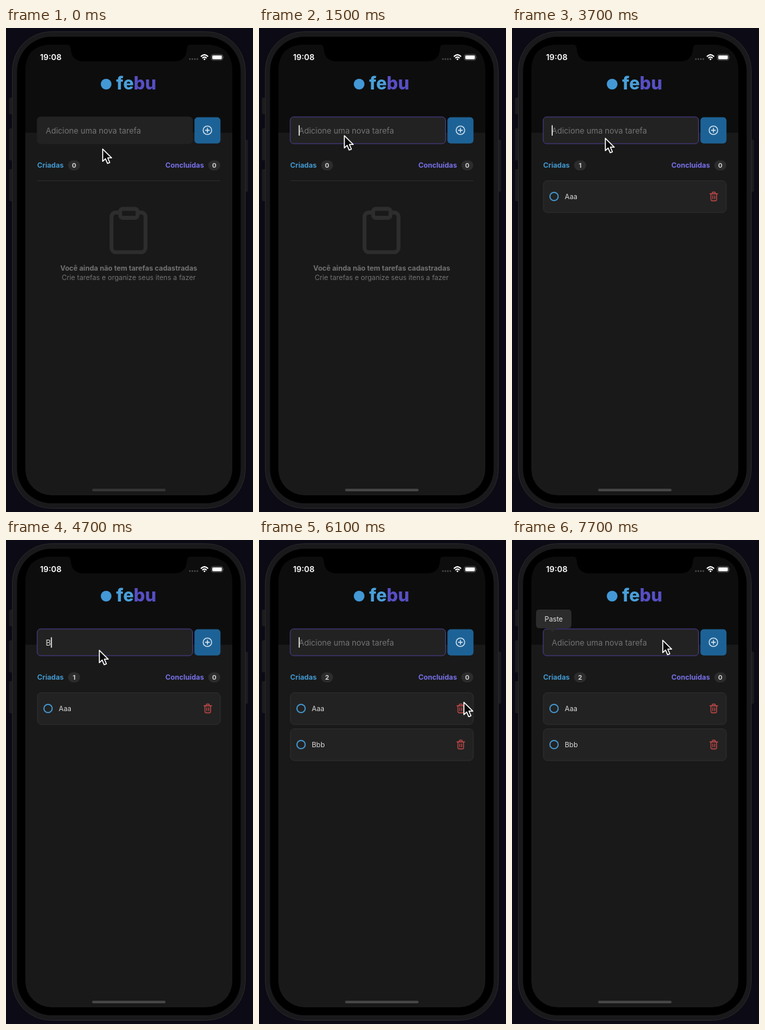
An HTML page that plays this animation: 370x724 px, repeating every 8000 ms.

```html
<!DOCTYPE html>
<html lang="pt">
<head>
<meta charset="utf-8">
<style>
  html, body { margin: 0; width: 100%; height: 100%; overflow: hidden; background: #0c0a14; }
  svg { display: block; width: 370px; height: 724px; font: 10.4px Inter, sans-serif; }
  .bold { font-weight: 700; font-size: 10.5px; }
  .mid { text-anchor: middle; }
  .line { fill: none; stroke-linecap: round; stroke-linejoin: round; }
</style>
</head>
<body>
<svg viewBox="0 0 370 724">
  <defs>
    <g id="card">
      <rect x="47" y="228.5" width="274" height="47.5" rx="6" fill="#222" stroke="#2e2e2e"/>
      <circle cx="63" cy="252" r="6.2" fill="none" stroke="#4398cf" stroke-width="1.7"/>
      <path class="line" stroke="#c24848" stroke-width="1.3"
        d="M296.5 248H308M298 248V257Q298 258.5 299.5 258.5H305Q306.5 258.5 306.5 257V248M300 248V246.5Q300 245.5 301 245.5H303.5Q304.5 245.5 304.5 246.5V248M300.8 251V255.5M303.7 251V255.5"/>
    </g>
  </defs>

  <!-- phone -->
  <g fill="#1c1c1f">
    <rect x="4.5" y="104" width="7" height="25" rx="2"/>
    <rect x="4.5" y="150" width="7" height="48" rx="2"/>
    <rect x="4.5" y="211" width="7" height="48" rx="2"/>
    <rect x="356" y="167" width="6.5" height="78" rx="2"/>
  </g>
  <rect x="9.5" y="5.5" width="349" height="713" rx="58" fill="#19191b" stroke="#272729"/>
  <rect x="16.5" y="13" width="335" height="698" rx="52" fill="#000"/>
  <rect x="29" y="25" width="310" height="674" rx="39" fill="#191919"/>
  <path d="M29 156.5V64Q29 25 68 25H300Q339 25 339 64V156.5Z" fill="#0d0d0d"/>
  <path d="M90 24Q97 25 97 31Q98 50 117 50H251Q270 50 271 31Q271 25 278 24Z" fill="#000"/>

  <!-- status bar -->
  <text x="51" y="48.3" font-size="12" font-weight="600" fill="#fff">19:08</text>
  <path class="line" d="M275.5 46.5H287" stroke="#505050" stroke-width="2.4" stroke-dasharray="0 3.7"/>
  <path class="line" d="M292.5 42.3Q297.3 37.7 302.1 42.3M294.6 44.6Q297.3 42.2 300 44.6" stroke="#fff" stroke-width="1.9"/>
  <circle cx="297.3" cy="46.8" r="1.3" fill="#fff"/>
  <rect x="307.7" y="39.7" width="17" height="8.3" rx="2.5" fill="none" stroke="#777" stroke-width=".8"/>
  <rect x="309" y="41" width="14.4" height="5.7" rx="1.4" fill="#fff"/>
  <path d="M325.7 42.5Q327 43.8 325.7 45.2Z" fill="#777"/>

  <!-- header -->
  <circle cx="150" cy="84" r="8" fill="#4398d6"/>
  <text x="165" y="92" font-size="26.5" font-weight="800" fill="#4a9fd9">fe<tspan fill="#574fc4">bu</tspan></text>

  <rect id="field" x="46.8" y="133" width="232.6" height="40" rx="5" fill="#222"/>
  <text id="typed" x="59.5" y="157.5" font-size="11.85"></text>
  <rect id="caret" x="59.5" y="145.5" width="1.5" height="15.5" fill="#eee"/>
  <rect id="button" x="282.3" y="133.5" width="39" height="39.3" rx="5"/>
  <g id="plus" class="line" stroke="#dce8f0" stroke-width="1.3">
    <circle cx="301.7" cy="153" r="6.4"/>
    <path d="M298.7 153H304.7M301.7 150V156"/>
  </g>
  <g id="spinner" class="line" stroke="#d3e2ec" stroke-width="1.6"></g>

  <!-- counters -->
  <g class="bold">
    <text x="46.8" y="209.3" fill="#4398cf">Criadas</text>
    <text x="238.8" y="209.3" fill="#7770e8">Concluídas</text>
    <rect x="93" y="198" width="18" height="15" rx="7.5" fill="#2c2c2c"/>
    <rect x="303" y="198" width="18" height="15" rx="7.5" fill="#2c2c2c"/>
    <g class="mid" font-size="9.5" fill="#d4d4d4">
      <text id="count" x="102" y="209"></text>
      <text x="312" y="209">0</text>
    </g>
  </g>

  <!-- empty list -->
  <g id="empty">
    <path d="M47 228.5H321" stroke="#2b2b2b"/>
    <g stroke="#2d2d2d" stroke-width="5.8" fill="#191919">
      <rect x="158" y="276" width="51" height="59.3" rx="6.5"/>
      <rect x="171" y="270.5" width="26" height="13.5" rx="4"/>
    </g>
    <g class="mid" fill="#727272">
      <text class="bold" x="183.8" y="362.7">Você ainda não tem tarefas cadastradas</text>
      <text x="183.8" y="377">Crie tarefas e organize seus itens a fazer</text>
    </g>
  </g>

  <g fill="#d8d8d8">
    <g id="first"><use href="#card"/><text x="79" y="256">Aaa</text></g>
    <g id="second"><use href="#card" y="54"/><text x="79" y="310">Bbb</text></g>
  </g>

  <g id="paste">
    <path d="M41 104H84Q89 104 89 109V127Q89 132 84 132H66L60.5 137.5L55 132H41Q36 132 36 127V109Q36 104 41 104Z" fill="#2c2c2d"/>
    <text class="mid" x="62.5" y="122" fill="#e2e2e2">Paste</text>
  </g>

  <rect id="home" x="129" y="689.3" width="110" height="3.7" rx="1.8"/>
  <path id="pointer" d="M.8 1V19.5L5 15.6L8.1 22.6L11.4 21.2L8.4 14.3H14.2Z" fill="#080808" stroke="#fff" stroke-width="1.5" stroke-linejoin="round"/>
</svg>

<script>
const LOOP = 8000, STEP = 100;
const FOCUS = 1200;

// Each round types a word, waits for the server, then adds the task.
const WORDS = ['Aaa', 'Bbb'], FIRST_ROUND = 1700, ROUND = 2900;
const LETTER = 200, SUBMIT = 1000, ADDED = 1400, PASTE = ADDED + 1200;

// Pointer stops: arrival, travel time, x, y
const stops = [
  [0, 0, 144, 180], [800, 700, 127, 160], [2500, 700, 308, 160], [3600, 600, 139, 164],
  [5400, 700, 310, 154], [6300, 500, 304, 263], [6900, 600, 225, 149]
];

const el = id => document.getElementById(id);
const set = (id, attrs) => { for (const k in attrs) el(id).setAttribute(k, attrs[k]); };
const show = (id, amount) => set(id, { opacity: Number(amount) });
const clamp = v => Math.min(1, Math.max(0, v));

function pointerAt(t) {
  let [, , x, y] = stops[0];
  for (const [arrival, travel, toX, toY] of stops.slice(1)) {
    const u = clamp((t - arrival + travel) / travel), ease = u * u * (3 - 2 * u);
    x += (toX - x) * ease;
    y += (toY - y) * Math.sqrt(ease);
  }
  return [x, y];
}

const spokes = Array.from({ length: 8 }, (_, i) => {
  const spoke = document.createElementNS('http://www.w3.org/2000/svg', 'path');
  spoke.setAttribute('d', 'M0 -3.6V-6.9');
  spoke.setAttribute('transform', `translate(301.7 153) rotate(${i * 45})`);
  return el('spinner').appendChild(spoke);
});

function render(t) {
  const focused = t >= FOCUS;
  const round = Math.min(WORDS.length - 1, Math.max(0, Math.floor((t - FIRST_ROUND) / ROUND)));
  const since = t - FIRST_ROUND - round * ROUND;
  const added = since >= ADDED;
  const loading = since >= SUBMIT && !added;
  const hover = since >= SUBMIT - 200 && !added;
  const count = round + added;
  const text = added || since < 0 ? '' : WORDS[round].slice(0, 1 + since / LETTER);

  const typed = el('typed');
  typed.textContent = text || 'Adicione uma nova tarefa';
  set('typed', { fill: text ? '#d8d8d8' : '#747474' });
  set('caret', { x: 59.5 + (text ? typed.getComputedTextLength() : 0) });
  show('caret', focused && !loading && (added ? clamp((PASTE - 300 - since) / 300) : 1));
  set('field', { stroke: focused ? '#4a3f90' : '#222' });
  set('button', { fill: hover ? '#216da1' : '#1d6296' });
  show('plus', !loading);
  show('spinner', loading);
  spokes.forEach((s, i) => s.setAttribute('opacity', 1 - ((t / STEP - i + 8) % 8) * .1));

  el('count').textContent = count;
  show('empty', !count);
  show('first', count > 0);
  show('second', count > 1);
  show('paste', clamp((since - PASTE + STEP) / 200));
  set('home', { fill: focused ? '#474747' : '#363636' });
  set('pointer', { transform: `translate(${pointerAt(t)})` });
}

const start = performance.now();
function tick() {
  const t = (performance.now() - start) % LOOP;
  render(Math.floor(t / STEP) * STEP);
  requestAnimationFrame(tick);
}
tick();
</script>
</body>
</html>
```
